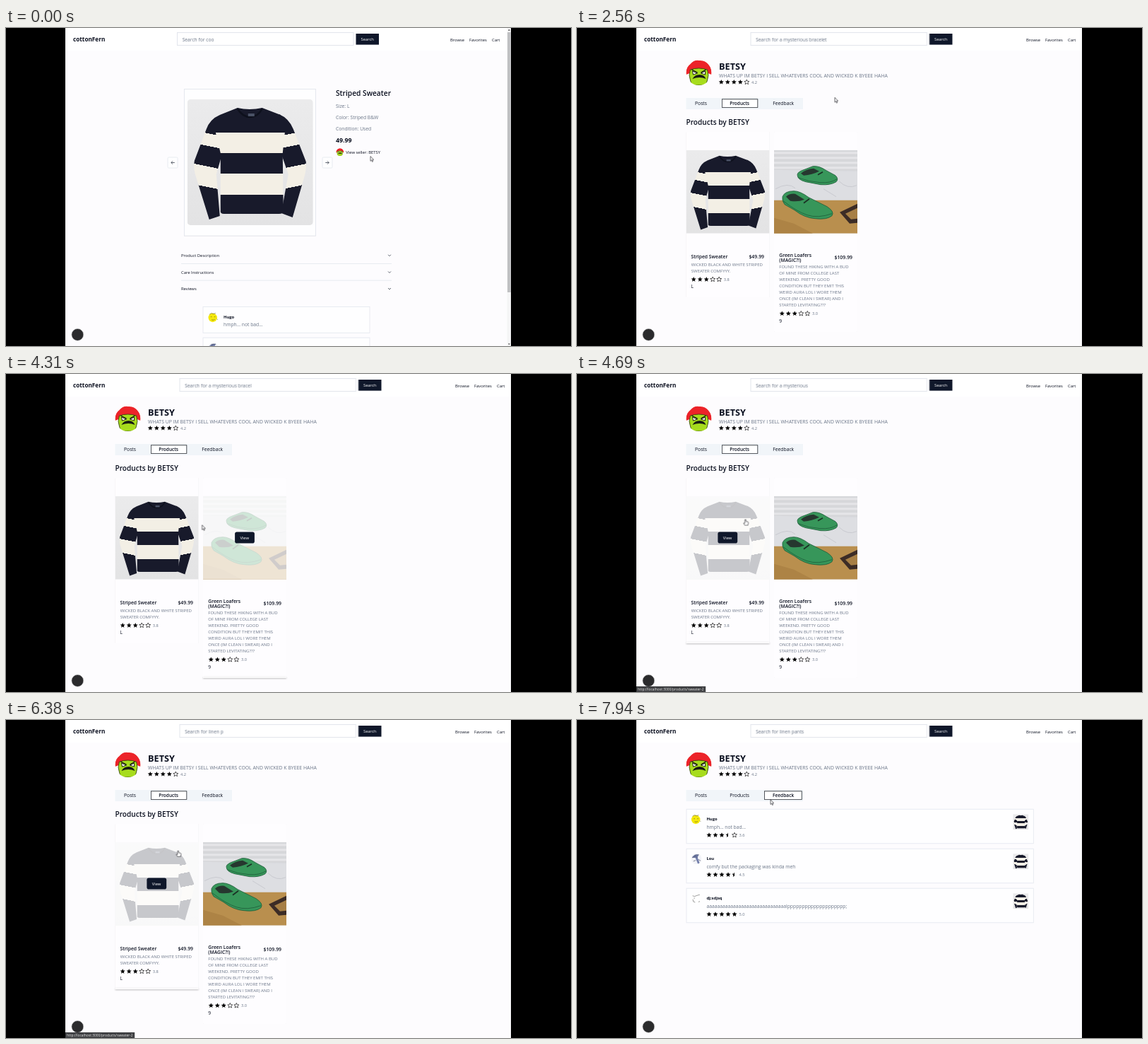
An HTML page that plays this animation: 800x450 px, repeating every 8000 ms.

```html
<!DOCTYPE html>
<html lang="en">
<head>
<meta charset="utf-8">
<title>Shop profile</title>
<style>
html, body { margin: 0; width: 100%; height: 100%; overflow: hidden; background: #000; }
svg { display: block; }
#stage { width: 800px; height: 450px; font: 5.85px "Open Sans", "Noto Sans", sans-serif; }
text { fill: #0b1020; white-space: pre; }
.body { font-size: 6.75px; }
.grey { fill: #6b7688; }
.desc { font-size: 6px; fill: #6b7688; }
.mid { font-weight: 500; }
.semi { font-weight: 600; }
.bold { font-weight: 700; }
.white { fill: #fff; }
.url { font-size: 4.9px; fill: #e6e6e6; }
.box { fill: #fefeff; stroke: #e3e7ee; stroke-width: .8; }
.line { fill: none; stroke: #39414f; stroke-width: .8; }
.rule { stroke: #e3e7ee; stroke-width: .8; }
.dark { fill: #0f172a; }
.raised { filter: drop-shadow(0 .8px .6px #0002); }
.card { fill: #fefdff; filter: drop-shadow(0 .8px .5px #0000001c); }
.lifted { filter: drop-shadow(0 1px 1.2px #0005); }
.active { fill: #fff; stroke: #30343c; stroke-width: .75; filter: drop-shadow(0 .6px .3px #0007); }

/* Hard switches */
.cut { animation: 8s step-end infinite; }
.product { animation-name: product; }
.profile { animation-name: profile; }
.centre { animation-name: centre; }
.nav { animation-name: nav; }
.link { animation-name: link; }
.status1 { animation-name: status1; }
.status2 { animation-name: status2; }
.tabHover { animation-name: tabHover; }
.listing { animation-name: listing; }
.feedback { animation-name: feedback; }
.arrow { animation-name: arrow; }
.hand { animation-name: hand; }
@keyframes product { 0% { opacity: 1 } 11.75%, 100% { opacity: 0 } }
@keyframes profile { 0% { opacity: 0 } 11.75%, 100% { opacity: 1 } }
@keyframes centre { 0% { transform: none } 11.75%, 100% { transform: translateX(3.5px) } }
@keyframes nav { 0% { transform: none } 11.75%, 100% { transform: translateX(7px) } }
@keyframes link { 0% { opacity: 0 } 3%, 100% { opacity: 1 } }
@keyframes status1 { 0% { opacity: 0 } 4% { opacity: 1 } 18%, 100% { opacity: 0 } }
@keyframes status2 { 0% { opacity: 0 } 58.5% { opacity: 1 } 81.5%, 100% { opacity: 0 } }
@keyframes tabHover { 0% { opacity: 0 } 84.3%, 100% { opacity: 1 } }
@keyframes listing { 0% { opacity: 1 } 88.2%, 100% { opacity: 0 } }
@keyframes feedback { 0% { opacity: 0 } 88.2%, 100% { opacity: 1 } }
@keyframes arrow { 0% { opacity: 1 } 3% { opacity: 0 } 11.75% { opacity: 1 } 57% { opacity: 0 } 80%, 100% { opacity: 1 } }
@keyframes hand { 0% { opacity: 0 } 3% { opacity: 1 } 11.75% { opacity: 0 } 57% { opacity: 1 } 80%, 100% { opacity: 0 } }

/* Fades and pointer path */
.fade { animation: 8s ease infinite; }
.hoverShoes { animation-name: hoverShoes; }
.hoverKnit { animation-name: hoverKnit; }
@keyframes hoverShoes { 0%, 39% { opacity: 0 } 41.5%, 54% { opacity: 1 } 56.5%, 100% { opacity: 0 } }
@keyframes hoverKnit { 0%, 55.5% { opacity: 0 } 58%, 80% { opacity: 1 } 82.5%, 100% { opacity: 0 } }
.pointer { animation: pointer 8s ease-in-out infinite; }
@keyframes pointer {
  0% { transform: translate(516px, 181.5px) }
  3%, 11% { transform: translate(514px, 177.5px) }
  14%, 21% { transform: translate(514px, 180px) }
  30.5%, 36.7% { transform: translate(365px, 98.3px) }
  46%, 47% { transform: translate(340px, 326px) }
  53.9% { transform: translate(277.6px, 213.6px) }
  60%, 77.4% { transform: translate(234px, 204.6px) }
  85%, 95.3% { transform: translate(282px, 106px) }
  99.2%, 100% { transform: translate(274px, 112.6px) }
}
</style>
</head>
<body>
<svg id="stage" viewBox="0 0 800 450">
<defs>
  <linearGradient id="bodyStripes" gradientUnits="userSpaceOnUse" x1="0" y1="0" x2="0" y2="178"></linearGradient>
  <linearGradient id="leftStripes" gradientUnits="userSpaceOnUse" x1="28" y1="0" x2="-8" y2="178"></linearGradient>
  <linearGradient id="rightStripes" gradientUnits="userSpaceOnUse" x1="150" y1="0" x2="186" y2="178"></linearGradient>
  <linearGradient id="wall" x2="0" y2="1"><stop stop-color="#ebebec"/><stop offset="1" stop-color="#e3e3e4"/></linearGradient>
  <clipPath id="round"><circle r="18"/></clipPath>
  <path id="star" d="M0-3.5 1-1.2 3.5-1 1.6.7 2.2 3.1 0 1.8-2.2 3.1-1.6.7-3.5-1-1-1.2Z"/>
  <path id="half" d="M0-3.5V1.8L-2.2 3.1-1.6.7-3.5-1-1-1.2Z"/>

  <symbol id="knit" viewBox="0 0 178 178">
    <rect width="178" height="178" fill="url(#wall)"/>
    <path fill="url(#leftStripes)" d="M46 22Q32 28 27 42L10 87Q8 98 13 112L31 170 46 165 41 106 50 75Z"/>
    <path fill="url(#rightStripes)" d="M130 21Q144 27 150 42L168 88Q169 99 165 112L149 167 133 161 143 106 132 74Z"/>
    <path fill="url(#bodyStripes)" d="M71 12Q88 16 106 12L132 22 139 38 135 76 136 157Q136 162 130 162H52Q46 162 47 157L47 76 38 38 46 22Z"/>
    <path fill="none" stroke="#0d101c" stroke-width="2.5" d="M71 13Q78 25 89 25T106 13"/>
    <path fill="#4a5266" d="M86 20h9v4h-9z"/>
  </symbol>

  <symbol id="shoes" viewBox="0 0 118 118">
    <rect width="118" height="118" fill="#d6d7da"/>
    <path fill="none" stroke="#e5e5e8" stroke-width="3" d="M0 4H118M0 11H118M0 18H118M0 25H118"/>
    <path fill="#dddee2" d="M0 28 118 30V72H0Z"/>
    <path fill="none" stroke="#c9cad0" d="M2 55Q20 45 30 54M92 44Q104 56 117 50M70 55 88 66"/>
    <path fill="#b98f4e" d="M0 71H118V118H0Z"/>
    <path fill="#ad8345" d="M0 96 28 104 55 118H0Z"/>
    <path fill="#3c2c26" d="M93 88 118 76V103L107 104Z"/>
    <path fill="#a77f45" d="M101 90 118 82V97L109 98Z"/>
    <g fill="#37965a" stroke="#1d5c39" stroke-width=".8">
      <path d="M33 35Q33 31 42 28L55 23Q64 22 74 29L87 36Q92 41 88 45 80 50 66 49L45 45Q33 42 33 35Z"/>
      <path d="M12 66Q15 58 28 58 37 58 49 67L75 80Q86 87 82 93 75 99 58 97 43 96 29 85L15 77Q11 72 12 66Z"/>
      <path fill="none" d="M34 39Q49 45 65 46T89 41M13 72Q32 87 47 92T82 90"/>
    </g>
    <path fill="#26372f" d="M38 33Q45 27 56 26L64 30Q54 35 42 36ZM17 66Q22 61 30 62L43 70Q34 74 23 72Z"/>
    <path fill="none" stroke="#1b3326" stroke-width="1.8" d="M62 35 69 31M42 75 50 69"/>
  </symbol>

  <symbol id="face" viewBox="-18 -18 36 36">
    <g clip-path="url(#round)">
      <path fill="#fff" d="M-18-18H18V18H-18Z"/>
      <path fill="#ec2329" d="M-18 3Q-19-7-12-12-7-18 0-17 9-18 14-11 19-5 18 3L13 1H-13Z"/>
      <path fill="#a7dc1d" stroke="#27350a" stroke-width=".8" d="M-12-4Q0-8 12-4 15 4 12 11L10 18H-10L-12 11Q-15 4-12-4Z"/>
      <path fill="#fff" stroke="#111" stroke-width=".9" d="M-9-2-2 1-8 3ZM9-2 3 1 9 3Z"/>
      <path fill="none" stroke="#111" stroke-width="1.2" d="M-10-4-2 0M10-4 3 0"/>
      <path fill="#181c12" d="M-9 9Q-6 3 1 3 8 3 10 9 1 5-9 9Z"/>
    </g>
  </symbol>
  <symbol id="yellow" viewBox="-18 -18 36 36"><g clip-path="url(#round)">
    <path fill="#fff" d="M-18-18H18V18H-18Z"/><circle cx="-2" cy="1" r="15" fill="#f4e80c"/>
    <path fill="none" stroke="#6d6413" stroke-width="1.6" d="M-13-10-7-14 1-12 8-14M-9-2h4M3-2h4M-6 8Q0 11 5 7M12 5l3 3"/>
  </g></symbol>
  <symbol id="blue" viewBox="-18 -18 36 36"><g clip-path="url(#round)">
    <path fill="#f3f4f8" d="M-18-18H18V18H-18Z"/><path fill="#7480ad" d="M-15-5Q-5-18 8-14L4-5 12 16 5 17-3-3Z"/>
    <path fill="none" stroke="#454b63" stroke-width="1.6" d="M-14-4-4-8 4-5M-10 8-2 5M7 2 15 7M-7-12 9-14"/>
  </g></symbol>
  <symbol id="plain" viewBox="-18 -18 36 36"><g clip-path="url(#round)">
    <path fill="#fff" d="M-18-18H18V18H-18Z"/>
    <path fill="none" stroke="#555" stroke-width="1.4" d="M-13-9-6-7 2-10 12-13M-12 3-10 11-4 13M7 12 12 10M-9-1h4"/>
  </g></symbol>
</defs>

<rect x="84" width="631" height="450" fill="#fdfcfe"/>

<g class="cut product">
  <rect class="box raised" x="252.5" y="86.5" width="186" height="207.5"/>
  <use href="#knit" x="256.5" y="101" width="178.5" height="178"/>
  <rect x="255.7" y="100.2" width="180" height="179.6" rx="5.5" fill="none" stroke="#fefeff" stroke-width="1.8"/>
  <rect class="box" x="229" y="183" width="14" height="15" rx="1.5"/>
  <rect class="box" x="448" y="183" width="14" height="15" rx="1.5"/>
  <path class="line" d="M238.8 190.5H234M236 188.3 233.8 190.5 236 192.7M452.3 190.5H457.2M455 188.3 457.2 190.5 455 192.7"/>
  <text class="semi" x="467" y="96.3" font-size="10.2">Striped Sweater</text>
  <g class="body">
    <text class="grey" x="467" y="112.8">Size: L</text>
    <text class="grey" x="467" y="128.8">Color: Striped B&amp;W</text>
    <text class="grey" x="467" y="144.8">Condition: Used</text>
  </g>
  <text class="bold" x="467" y="162.4" font-size="8.8">49.99</text>
  <use href="#face" x="467.3" y="170" width="11" height="11"/>
  <text x="481.3" y="178.3">View seller: BETSY</text>
  <path class="line cut link" stroke-width=".5" d="M481.3 179.6H531"/>
  <g class="mid">
    <text x="248" y="324.3">Product Description</text>
    <text x="248" y="347.9">Care Instructions</text>
    <text x="248" y="371.4">Reviews</text>
  </g>
  <path class="line" d="M541 320.8l2 2 2-2M541 344.5l2 2 2-2M541 368l2 2 2-2"/>
  <path class="rule" d="M248 333.5H546M248 357.2H546"/>
  <rect class="box" x="279" y="394.5" width="236" height="37"/>
  <rect class="box" x="279" y="438.2" width="236" height="37"/>
  <use href="#yellow" x="286" y="402" width="15" height="15"/>
  <use href="#blue" x="286" y="445.5" width="15" height="15"/>
  <text class="bold" x="308" y="410.6">Hugo</text>
  <text class="body grey" x="308" y="421.6">hmph... not bad...</text>
</g>

<g class="cut profile">
  <use href="#face" x="154.5" y="45" width="36" height="36"/>
  <text class="bold" x="201" y="59.4" font-size="12.7">BETSY</text>
  <text class="grey" x="201" y="69.8" font-size="6.9">WHATS UP IM BETSY I SELL WHATEVERS COOL AND WICKED K BYEEE HAHA</text>
  <g data-stars="204.3 76.5 4.2"></g>
  <rect x="154.5" y="99" width="165.5" height="16" fill="#f1f5f9"/>
  <text class="body" x="167" y="109.3">Posts</text>

  <g class="cut listing">
    <rect class="active" x="205.4" y="100.8" width="50.4" height="11.8"/>
    <text class="semi" x="216.2" y="109.3" font-size="6.5">Products</text>
    <text class="body" x="277.3" y="109.3">Feedback</text>
    <g class="cut tabHover">
      <rect x="265.5" y="99.8" width="53.7" height="14.2" fill="#fff"/>
      <text class="semi" x="277.3" y="109.3" font-size="6.6">Feedback</text>
    </g>
    <text class="semi" x="154.5" y="137" font-size="10.1">Products by BETSY</text>

    <rect class="card" x="154.6" y="147" width="118" height="234" rx="1"/>
    <rect class="card" x="279" y="147" width="118" height="283" rx="1"/>
    <use href="#knit" x="154.6" y="172.7" width="118" height="118"/>
    <use href="#shoes" x="279" y="172.7" width="118" height="118"/>

    <g class="fade hoverKnit">
      <path class="lifted white" d="M154.6 379.5H272.6V381H154.6Z"/>
      <rect class="white" x="154.6" y="172.7" width="118" height="118" fill-opacity=".76"/>
      <rect class="dark" x="199.4" y="223.4" width="27.8" height="16.2" rx="2.8"/>
      <text class="white mid" x="206.7" y="233.6">View</text>
    </g>
    <g class="fade hoverShoes">
      <path class="lifted white" d="M279 428.5H397V430H279Z"/>
      <rect class="white" x="279" y="172.7" width="118" height="118" fill-opacity=".76"/>
      <rect class="dark" x="324.1" y="223.4" width="27.8" height="16.2" rx="2.8"/>
      <text class="white mid" x="331.4" y="233.6">View</text>
    </g>

    <g class="semi" font-size="6.75">
      <text x="161.6" y="325.5">Striped Sweater</text>
      <text x="265" y="325.6" text-anchor="end" font-size="6.9">$49.99</text>
      <text x="286.3" y="324">Green Loafers</text>
      <text x="286.3" y="331.2">(MAGIC?!)</text>
      <text x="390" y="327.4" text-anchor="end" font-size="6.9">$109.99</text>
    </g>
    <text class="desc" x="161.8" y="337">WICKED BLACK AND WHITE STRIPED<tspan x="161.8" dy="9">SWEATER COMFYYY.</tspan></text>
    <text class="desc" x="286.3" y="340.4">FOUND THESE HIKING WITH A BUD<tspan x="286.3" dy="9">OF MINE FROM COLLEGE LAST</tspan><tspan x="286.3" dy="9">WEEKEND. PRETTY GOOD</tspan><tspan x="286.3" dy="9">CONDITION BUT THEY EMIT THIS</tspan><tspan x="286.3" dy="9">WEIRD AURA LOL I WORE THEM</tspan><tspan x="286.3" dy="9">ONCE (IM CLEAN I SWEAR) AND I</tspan><tspan x="286.3" dy="9">STARTED LEVITATING???</tspan></text>
    <g data-stars="165.2 355.6 3 3.8"></g>
    <g data-stars="290.3 404 3 3.0"></g>
    <text class="body" x="161.6" y="368.4">L</text>
    <text class="body" x="286.3" y="416.6">9</text>
  </g>

  <g class="cut feedback">
    <rect class="active" x="265.6" y="100.8" width="52.6" height="11.8"/>
    <text class="body" x="216.2" y="109.3">Products</text>
    <text class="semi" x="277" y="109.3" font-size="6.6">Feedback</text>
    <g id="reviews"></g>
  </g>
</g>

<g>
  <rect class="raised white" x="84" width="631" height="32"/>
  <text class="bold" x="95" y="19.2" font-size="8.2">cottonFern</text>
  <g class="cut centre">
    <rect class="white" x="242.5" y="6.5" width="249.5" height="18" stroke="#dfe3ea" stroke-width=".9"/>
    <text id="query" class="grey" x="249.7" y="18.6" font-size="6.7"></text>
    <rect class="dark" x="495.5" y="8" width="32.5" height="15.6"/>
    <text class="white mid" x="502.5" y="18.2">Search</text>
  </g>
  <g class="cut nav">
    <text x="629" y="18.6">Browse</text>
    <text x="656" y="18.6">Favorites</text>
    <text x="688" y="18.6">Cart</text>
  </g>
</g>

<g class="cut product">
  <rect x="709.5" width="5.5" height="450" fill="#f5f5f6"/>
  <rect x="710" y="6" width="4.6" height="368" fill="#bfc0c2"/>
  <path fill="#555" d="M710.8 3.8h3l-1.5-2.2zM710.8 446.4h3l-1.5 2.2z"/>
</g>

<circle cx="101.3" cy="434" r="8.5" fill="#2b2b2d" stroke="#dcdcde" stroke-width=".6"/>

<g class="cut status1">
  <rect x="84" y="442" width="78" height="8" fill="#3f4043"/>
  <text class="url" x="86" y="447.9">http://localhost:3000/users/betsy</text>
</g>
<g class="cut status2">
  <rect x="84" y="442" width="98.2" height="8" fill="#3f4043"/>
  <text class="url" x="86" y="447.9">http://localhost:3000/products/sweater-2</text>
</g>

<g class="pointer" fill="#fff" stroke="#1d1d22" stroke-width=".65" stroke-linejoin="round">
  <path class="cut arrow" d="M0 0V6.8L1.5 5.4 2.6 7.8 3.6 7.3 2.6 5H4.7Z"/>
  <path class="cut hand" d="M-.8.7Q0-.4.8.7V3L3.6 3.7Q4.4 4.1 4.2 5.3L3.5 8.6H-.8L-2.7 5.7Q-2.3 4.6-.8 5.6Z"/>
</g>
</svg>

<script>
const $ = id => document.getElementById(id);

// Hard-edged knit bands: navy and cream alternate at each edge
function bands(id, edges) {
  const colors = ["#181a2b", "#f3efe5"];
  const stops = [0, ...edges, 178];
  $(id).innerHTML = stops.slice(1).map((end, i) =>
    [stops[i], end].map(y => `<stop offset="${y / 178}" stop-color="${colors[i % 2]}"/>`).join("")).join("");
}
bands("bodyStripes", [47, 76, 105, 135]);
bands("leftStripes", [46, 63, 91, 119]);
bands("rightStripes", [46, 63, 91, 119]);

function stars(x, y, score, label = score) {
  let out = "";
  for (let i = 0; i < 5; i++) {
    const rest = score - i;
    const at = `x="${x + i * 9}" y="${y}"`;
    if (rest >= 1) out += `<use href="#star" ${at}/>`;
    else if (rest >= .5) out += `<use href="#half" ${at}/>`;
    else out += `<use href="#star" ${at} fill="none" stroke="#111" stroke-width=".7"/>`;
  }
  return out + `<text class="grey" font-size="5.7" x="${x + 42.6}" y="${y + 2.3}">${label}</text>`;
}
document.querySelectorAll("[data-stars]").forEach(g => {
  const [x, y, score, label] = g.dataset.stars.split(" ");
  g.innerHTML = stars(+x, +y, +score, label);
});

const reviews = [
  ["yellow", "Hugo", "hmph... not bad...", 3.6, "3.6"],
  ["blue", "Lou", "comfy but the packaging was kinda meh", 4.5, "4.5"],
  ["plain", "dj;sdjsq", "a".repeat(30) + "l" + "p".repeat(20) + ";", 5, "5.0"]
];
$("reviews").innerHTML = reviews.map(([face, name, words, score, label], i) => `
  <g transform="translate(0 ${i * 56})">
    <rect class="box" x="155" y="126.2" width="491.3" height="48.6"/>
    <use href="#${face}" x="161.5" y="133" width="15" height="15"/>
    <text class="bold" x="183.4" y="141.6">${name}</text>
    <text class="body grey" x="183.4" y="154.2">${words}</text>
    ${stars(187, 162.8, score, label)}
    <use href="#knit" x="617.3" y="133.2" width="22" height="22"/>
  </g>`).join("");

// Placeholder: letters are typed every 104 ms and removed every 50 ms
const first = "coo", second = "a mysterious bracelet", third = "linen pants";
const typed = (t, start) => Math.max(0, (t - start) / 104 + 1);
const erased = (t, start) => Math.max(0, Math.floor((t - start) / 50));
function phrase(t) {
  if (t < 460) return first.slice(0, Math.max(0, 3 - erased(t, 0)));
  if (t < 5700) return second.slice(0, Math.max(0, Math.min(typed(t, 460), 21 - erased(t, 4200))));
  return third.slice(0, typed(t, 5750));
}

let origin;
function tick(now) {
  origin ??= now;
  $("query").textContent = "Search for " + phrase((now - origin) % 8000);
  requestAnimationFrame(tick);
}
requestAnimationFrame(tick);
</script>
</body>
</html>
```
